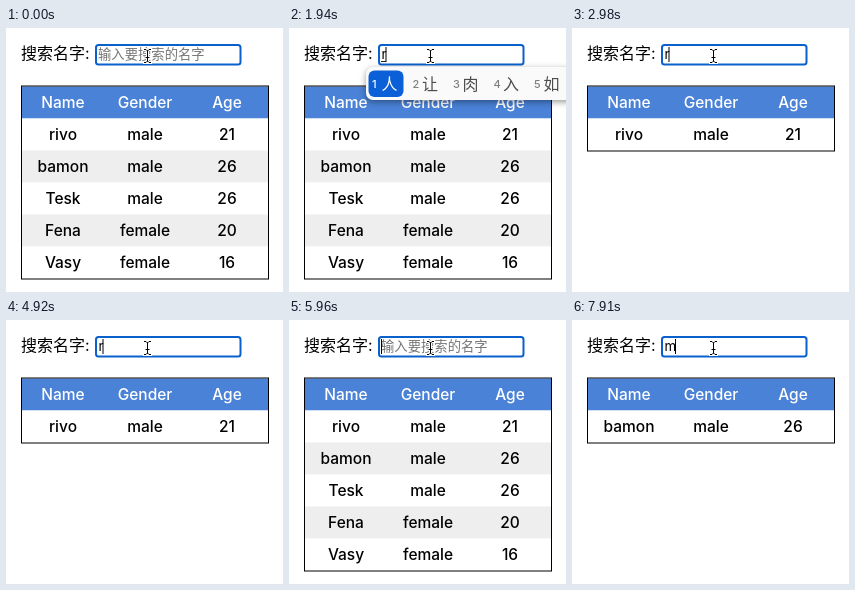
Animation of 277x264 px, one loop 8 s. Source, as an HTML page:

```html
<!DOCTYPE html>
<html lang="zh-CN">
<head>
<meta charset="utf-8">
<title>搜索名字</title>
<style>
html, body { margin: 0; width: 100%; height: 100%; overflow: hidden; background: #fff; }
svg { display: block; font-family: Inter, "Noto Sans CJK SC", sans-serif; }
#table text { font-size: 15.5px; font-weight: 450; text-anchor: middle; }
#popup text { font-size: 16px; font-weight: 500; fill: #4c4c4c; }
#popup text.key { font-size: 11px; fill: #808080; }
#popup text.on { fill: #fff; }
#popup .panel { fill: #fafafa; filter: drop-shadow(0 2px 3px #0006); }
.field { font-size: 13.33px; }
</style>
</head>
<body>
<svg width="277" height="264" viewBox="0 0 277 264">
  <defs>
    <path id="beam" d="M138.5 21.5h1.5l1.5 1.5 1.5-1.5h1.5M141.5 23v10M140 29.5h3M138.5 34.5h1.5l1.5-1.5 1.5 1.5h1.5"/>
  </defs>
  <text x="15" y="31" font-size="16">搜索名字:</text>
  <rect x="90" y="17" width="144.5" height="19.5" rx="2.5" fill="#fff" stroke="#0a60cc" stroke-width="2"/>
  <text id="hint" class="field" x="92" y="31" fill="#757575">输入要搜索的名字</text>
  <text id="value" class="field" x="92.5" y="31"></text>
  <path id="underline" d="M92 33.5h5" stroke="#222"/>
  <rect id="caret" y="19" width="1" height="15"/>
  <g id="table"></g>
  <g id="popup">
    <rect class="panel" x="77" y="39" width="220" height="33" rx="7"/>
    <rect x="79.5" y="42.5" width="35" height="26.5" rx="6" fill="#0b60d8"/>
  </g>
  <g fill="none" stroke-linecap="square">
    <use href="#beam" stroke="#fff" stroke-width="3"/>
    <use href="#beam" stroke="#000"/>
  </g>
</svg>
<script>
const $ = id => document.getElementById(id);
const LOOP = 8000, ROW = 32, TOP = 58.5;
const people = [
  ['rivo', 'male', 21], ['bamon', 'male', 26], ['Tesk', 'male', 26],
  ['Fena', 'female', 20], ['Vasy', 'female', 16]
];
// start time, typed text, active filter, whether the candidate list is open
const steps = [
  [0, '', '', false], [1940, 'r', '', true], [2980, 'r', 'r', false],
  [5220, '', '', false], [7910, 'm', 'm', false]
];
const caretX = { '': 92, r: 96.5, m: 103 };
// the caret is hidden from each first time to the second
const blinks = [[0, 450], [890, 1340], [2390, 2840], [3430, 4030], [4480, 4920],
  [5510, 5960], [6410, 7010], [7460, 7910]];

const rect = (x, y, w, h, attrs) => `<rect x="${x}" y="${y}" width="${w}" height="${h}" ${attrs}/>`;

function rowMarkup(row, i) {
  const y = TOP + ROW * i;
  const back = i ? (i % 2 ? '#fff' : '#eee') : '#4a82d7';
  const ink = i ? '#000' : '#fff';
  return rect(16, y, 246, ROW, `fill="${back}"`) + row.map((cell, col) =>
    `<text x="${57 + 82 * col}" y="${y + 21.5}" fill="${ink}">${cell}</text>`).join('');
}

function tableMarkup(filter) {
  const rows = [['Name', 'Gender', 'Age'], ...people.filter(p => p[0].includes(filter))];
  return rows.map(rowMarkup).join('') +
    rect(15.5, TOP - 0.5, 247, ROW * rows.length + 1, 'fill="none" stroke="#000"');
}

$('popup').innerHTML += [...'人让肉入如'].map((word, i) => {
  const x = 83 + 40.5 * i, on = i ? '' : 'on';
  return `<text class="key ${on}" x="${x}" y="60">${i + 1}</text>
    <text class="${on}" x="${x + 9.5}" y="61.5">${word}</text>`;
}).join('');

const show = (id, visible) => $(id).setAttribute('visibility', visible ? 'visible' : 'hidden');
let current;

function draw(now) {
  const t = now % LOOP;
  const step = steps.findLast(s => s[0] <= t);
  if (step !== current) {
    current = step;
    const [, typed, filter, composing] = step;
    $('value').textContent = typed;
    $('caret').setAttribute('x', caretX[typed]);
    $('table').innerHTML = tableMarkup(filter);
    show('hint', !typed);
    show('underline', composing);
    show('popup', composing);
  }
  show('caret', !blinks.some(([from, to]) => t >= from && t < to));
}

const start = performance.now();
function tick() {
  draw(performance.now() - start);
  requestAnimationFrame(tick);
}
tick();
</script>
</body>
</html>
```
